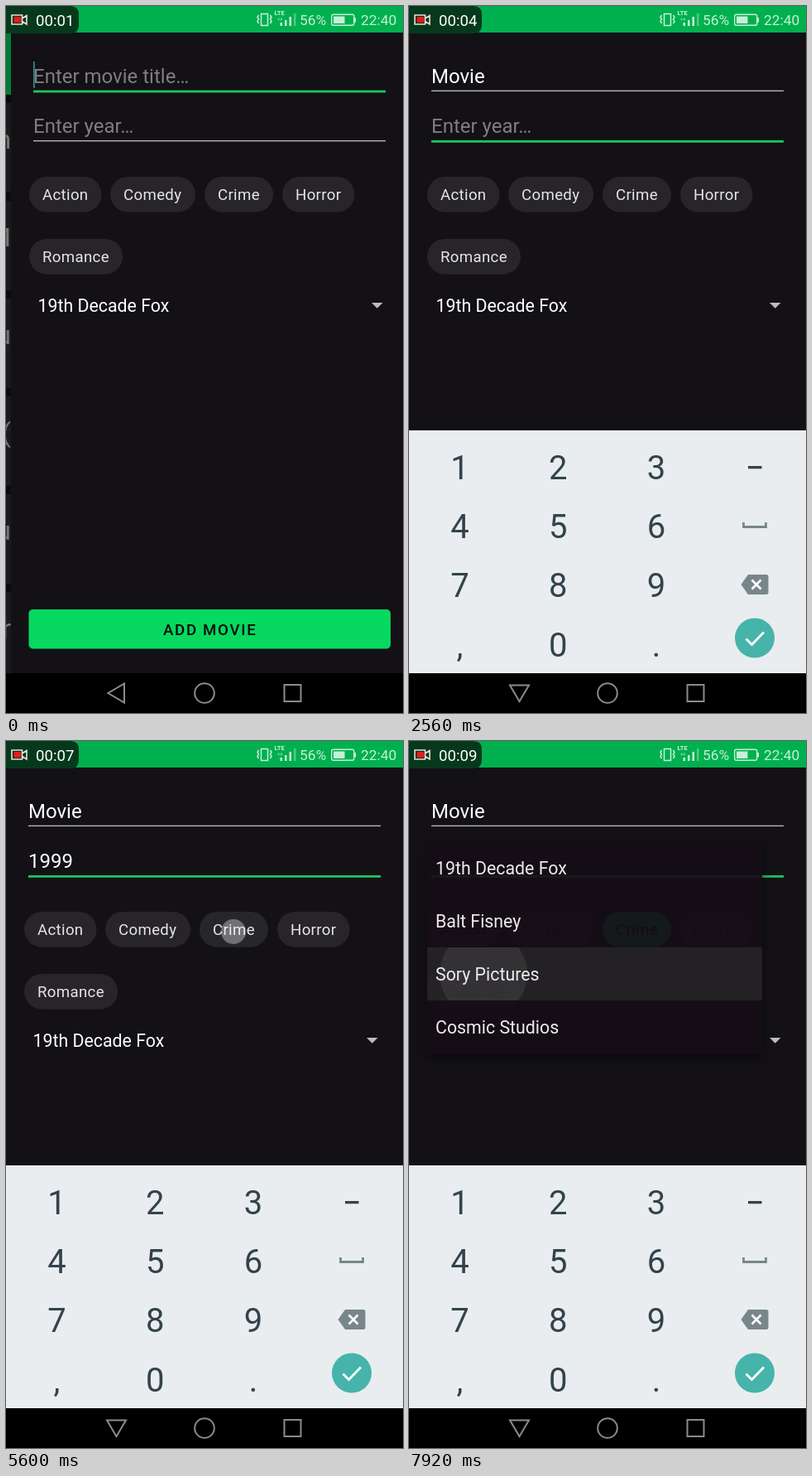
Animation, 480 px wide and 853 px high, one loop 8 s. Source, as an HTML page:

```html
<!DOCTYPE html>
<html lang="en">
<head>
<meta charset="utf-8">
<title>Add movie</title>
<style>
html, body { margin: 0; height: 100%; overflow: hidden; background: #000; }
svg { display: block; width: 100vw; height: 100vh; font-family: Roboto, sans-serif; }
.field { font-size: 24px; }
.chip { font-size: 18.67px; letter-spacing: .33px; }
.item { font-size: 21.33px; fill: #fff; }
.key { font-size: 29.3px; fill: #33434a; text-anchor: middle; }
.hint { font-size: 13.5px; font-weight: 700; fill: #7b878b; text-anchor: middle; }
.digit { font-size: 40px; fill: #33434a; text-anchor: middle; }
.line { fill: none; stroke-width: 2; }
</style>
</head>
<body>
<svg viewBox="0 0 480 853" preserveAspectRatio="none">
  <defs>
    <clipPath id="row"><path d="M22 249H427V313H22z"/></clipPath>
    <clipPath id="sliver"><path d="M0 32H6V805H0z"/></clipPath>
    <filter id="shade" x="-10%" y="-10%" width="120%" height="125%">
      <feDropShadow dx="0" dy="6" stdDeviation="7" flood-color="#000" flood-opacity=".5"/>
    </filter>
    <g id="erase">
      <path d="M-16.500 0L-8-12H14Q16.500-12 16.500-9.500V9.500Q16.500 12 14 12H-8z" fill="#78868a"/>
      <path d="M-3.500-5.500L7.500 5.500M7.500-5.500L-3.500 5.500" stroke="#fff" stroke-width="2.600"/>
    </g>
  </defs>

  <path d="M0 32H480V805H0z" fill="#0b0a0c"/>
  <g id="list" clip-path="url(#sliver)"><path d="M0 32H6V107H0z" fill="#007d38"/></g>

  <g id="page">
    <path d="M0 32H500V805H0z" fill="#131115"/>
    <text id="title" class="field" x="27" y="92.500"></text>
    <rect id="titleLine" x="27" width="426"/>
    <text id="year" class="field" x="27" y="152.500"></text>
    <rect id="yearLine" x="27" width="426"/>
    <rect id="cursor" width="1.700" height="32" fill="#2f9187"/>
    <g id="chips"></g>
    <text id="studio" class="item" x="32.500" y="369"></text>
    <path d="M436 358H449.500L442.750 364.700z" fill="#bcbbbd"/>
    <rect x="21.500" y="728" width="437.500" height="47.500" rx="5" fill="#06d860"/>
    <text x="184" y="758.700" font-size="18.670" font-weight="500" letter-spacing="1.670" fill="#0a0a0a">ADD MOVIE</text>
  </g>

  <g id="popup">
    <rect x="22" y="121" width="405" height="256" rx="2" fill="#131115" filter="url(#shade)"/>
    <g id="ripple" clip-path="url(#row)">
      <path d="M22 249H427V313H22z" fill="#252326"/>
      <circle id="wave" cx="90" cy="281" fill="#363437"/>
    </g>
  </g>

  <g id="letters">
    <path d="M0 512H480V805H0z" fill="#e9edf0"/>
    <path d="M38 678L54 695H46.500V704H30V695H22zM31 710H45.500V712H31z" fill="#78868a"/>
    <use href="#erase" x="441.500" y="691"/>
    <text x="15" y="771.500" font-size="24" fill="#5b696f">?1</text>
    <g class="line" stroke="#5b696f"><circle cx="51" cy="762.500" r="9.300"/><path d="M46 765Q51 771 56 765"/></g>
    <path d="M46.500 758.500h3v3h-3zM52.500 758.500h3v3h-3z" fill="#5b696f"/>
    <rect x="134" y="747" width="211.500" height="32" rx="3" fill="#cfd3d6"/>
    <text class="key" x="97" y="773">,</text><text class="key" x="382" y="773">.</text>
    <circle cx="441.500" cy="762.500" r="24" fill="#46b4aa"/>
    <path d="M428 762.500H450M443 755L450.500 762.500L443 770M454.500 754V771" class="line" stroke="#fff" style="stroke-width:2.600"/>
  </g>

  <g id="numbers">
    <path d="M0 512H480V805H0z" fill="#e9edf0"/>
    <path d="M410 555H426.500V558.300H410z" fill="#33434a"/>
    <path d="M404.500 623V628.500H431.500V623" class="line" stroke="#78868a" style="stroke-width:2.800"/>
    <use href="#erase" x="418" y="698"/>
    <circle cx="418" cy="762.500" r="24" fill="#46b4aa"/>
    <path d="M407.500 763.500L414.500 770.500L429 755.500" class="line" stroke="#fff" style="stroke-width:2.800"/>
  </g>

  <circle id="touch" r="15" fill="#fff" fill-opacity=".4" stroke="#777" stroke-opacity=".25"/>

  <path d="M0 0H480V32H0z" fill="#00b04f"/>
  <path d="M0 0H78Q88 0 88 10V23Q88 33 78 33H0z" fill="#06391c"/>
  <path d="M7 11H19.500V22H7zM19.500 15L25 11.500V22L19.500 18.500" fill="none" stroke="#f1dcdc" stroke-width="1.600"/>
  <rect id="rec" x="9.500" y="13" width="8.500" height="7" rx="1.500" fill="#f01818"/>
  <text id="clock" x="36" y="24" font-size="18.670" fill="#fff"></text>
  <g fill="#c6f0d6" stroke="none">
    <path d="M308.500 9.500H316.500V23.500H308.500zM305.500 11L304 13.500L305.500 16L304 18.500L305.500 21M319.500 11L321 13.500L319.500 16L321 18.500L319.500 21" fill="none" stroke="#c6f0d6" stroke-width="1.500"/>
    <text x="324.500" y="10.500" font-size="7.500" font-weight="700">LTE</text>
    <path d="M328 16l2.500-2v4zM334.500 16l-2.500-2v4z" opacity=".6"/>
    <path d="M331.500 20h2.500v4h-2.500zM337 17h2.500v7h-2.500zM342.500 13h2.500v11h-2.500z"/>
    <path d="M348 9h2.500v15h-2.500z" opacity=".4"/>
    <text x="355" y="23" font-size="17.330">56%</text>
    <rect x="393.700" y="10.200" width="27" height="13" rx="2" fill="none" stroke="#c6f0d6" stroke-width="1.400"/>
    <path d="M396 12.500H409.500V21H396zM421 14H423V19.500H421z"/>
    <text x="429" y="23" font-size="17.330">22:40</text>
  </g>

  <path d="M0 805H480V853H0z"/>
  <g class="line" stroke="#8b8b8b">
    <path id="back" d="M-11.500-9.500H11.500L0 10z"/>
    <circle cx="240" cy="829" r="11.800"/>
    <path d="M336.500 819H356.500V839H336.500z"/>
  </g>
</svg>
<script>
const LOOP = 8000;
const $ = id => document.getElementById(id);
const set = (el, attrs) => { for (const k in attrs) el.setAttribute(k, attrs[k]); };

function add(parent, tag, attrs, text = "") {
  const el = document.createElementNS("http://www.w3.org/2000/svg", tag);
  set(el, attrs);
  el.textContent = text;
  return $(parent).appendChild(el);
}

const ramp = (t, a, b) => Math.min(1, Math.max(0, (t - a) / (b - a)));
const easeOut = p => 1 - (1 - p) ** 2;
const show = (id, on) => set($(id), { opacity: +on });
const mix = (a, b, p) => `rgb(${a.map((v, i) => Math.round(v + (b[i] - v) * p))})`;

[..."hMu(ur"].forEach((c, i) => {
  const y = 117 + 118 * i;
  add("list", "rect", { y, width: 6, height: 108, fill: "#1b1a1c" });
  add("list", "text", { x: 6, y: y + 55, "font-size": 32, "text-anchor": "end", fill: "#777" }, c);
});

const chips = [
  ["Action", 22, 206, 87.5], ["Comedy", 120, 206, 103], ["Crime", 234, 206, 83],
  ["Horror", 328, 206, 87.5], ["Romance", 22, 281, 113]
].map(([name, x, y, width]) => {
  const box = add("chips", "rect", { x, y, width, height: 42.7, rx: 21.3, fill: "#272528" });
  add("chips", "text", { class: "chip", x: x + 16, y: y + 28 }, name);
  return box;
});

const studios = ["19th Decade Fox", "Balt Fisney", "Sory Pictures", "Cosmic Studios"];
studios.forEach((s, i) => add("popup", "text", { class: "item", x: 32, y: 161 + 64 * i }, s));

const keys = [];
[["qwertyuiop", 26, 560], ["asdfghjkl", 50, 631], ["zxcvbnm", 97, 702]].forEach(([row, x, y]) =>
  [...row].forEach((c, i) => keys.push([c, add("letters", "text", { class: "key", x: x + 47.45 * i, y })])));
[..."1234567890"].forEach((c, i) =>
  add("letters", "text", { class: "hint", x: 40 + 47.5 * i, y: 534 }, c));
[..."123456789,0."].forEach((c, i) =>
  add("numbers", "text", { class: "digit", x: 61.5 + 118.7 * (i % 3), y: 571 + 71.2 * Math.floor(i / 3) }, c));

const titleTimes = [1280, 1460, 1620, 1740, 1880];
const yearTimes = [3060, 3360, 3560, 3760];
const yearCursor = [[2060, 2560], [2920, 4280], [4680, 5160], [5640, 6140], [6320, 6820]];
const taps = [
  [1240, 382, 705], [1420, 405, 555], [1580, 239, 695], [1700, 358, 555], [1840, 120, 555],
  [2020, 441, 765], [3020, 62, 560], [3320, 299, 702], [3520, 299, 702], [3720, 299, 702],
  [5540, 275, 230], [6580, 240, 361], [7500, 90, 281]
];
const typed = (word, times, t) => word.slice(0, times.filter(k => t >= k).length);

function field(id, value, hint, ink) {
  $(id).textContent = value || hint;
  set($(id), { fill: value ? ink : "#807e82" });
  return value ? $(id).getComputedTextLength() : 0;
}

function underline(id, y, focused) {
  set($(id), { y, height: focused ? 2.8 : 1.4, fill: focused ? "#1fc45c" : "#b5b4b6" });
}

function draw(t) {
  // status and navigation bars
  const phase = (t + 60) % 1000;
  const sec = t < 40 ? 1 : Math.min(9, 2 + Math.floor((t + 60) / 1000));
  $("clock").textContent = "00:0" + sec;
  show("rec", t < 40 || (t > 680 && phase >= 540));
  set($("back"), { transform: `translate(133.500 829) rotate(${90 * (1 - ramp(t, 400, 600))})` });

  // form
  const slide = 6 * (1 - easeOut(ramp(t, 30, 160)));
  set($("page"), { transform: `translate(${slide})` });
  const onYear = t >= 2060, picked = t >= 7880;
  const ink = picked ? "#000" : "#fff";
  const titleW = field("title", typed("Movie", titleTimes, t), "Enter movie title…", "#fff");
  const yearW = field("year", typed("1999", yearTimes, t), "Enter year…", ink);
  underline("titleLine", 101.7, !onYear);
  underline("yearLine", 162, onYear);
  set($("cursor"), { x: 27 + (onYear ? yearW : titleW), y: onYear ? 127 : 67 });
  show("cursor", onYear ? yearCursor.some(([a, b]) => t >= a && t < b) : t < 440 || t >= 940);
  set($("chips"), { fill: picked ? "#000" : "#e6e5e7" });
  set(chips[2], { fill: mix([39, 37, 40], [0, 176, 79], ramp(t, 5600, 5800)) });
  $("studio").textContent = studios[picked ? 2 : 0];
  $("studio").style.fill = ink;

  // drop-down
  set($("popup"), { opacity: ramp(t, 6720, 6900) * (1 - .08 * ramp(t, 7880, 7920)) });
  set($("ripple"), { opacity: ramp(t, 7480, 7600) });
  set($("wave"), { r: 8 + 45 * easeOut(ramp(t, 7500, 7920)) });

  // keyboards
  const rise = easeOut(ramp(t, 750, 960));
  set($("letters"), { transform: `translate(0 ${293 * (1 - rise)})`, opacity: t < 2200 ? ramp(t, 750, 850) : 0 });
  keys.forEach(([c, el]) => el.textContent = t < 1280 ? c.toUpperCase() : c);
  show("numbers", t >= 2200);

  const tap = taps.find(([a]) => t >= a && t < a + 130);
  show("touch", 0);
  if (tap) set($("touch"), { cx: tap[1], cy: tap[2], opacity: 1 - ramp(t, tap[0] + 50, tap[0] + 130) });
}

const start = performance.now();
function tick() {
  draw((performance.now() - start) % LOOP);
  requestAnimationFrame(tick);
}
tick();
</script>
</body>
</html>
```
